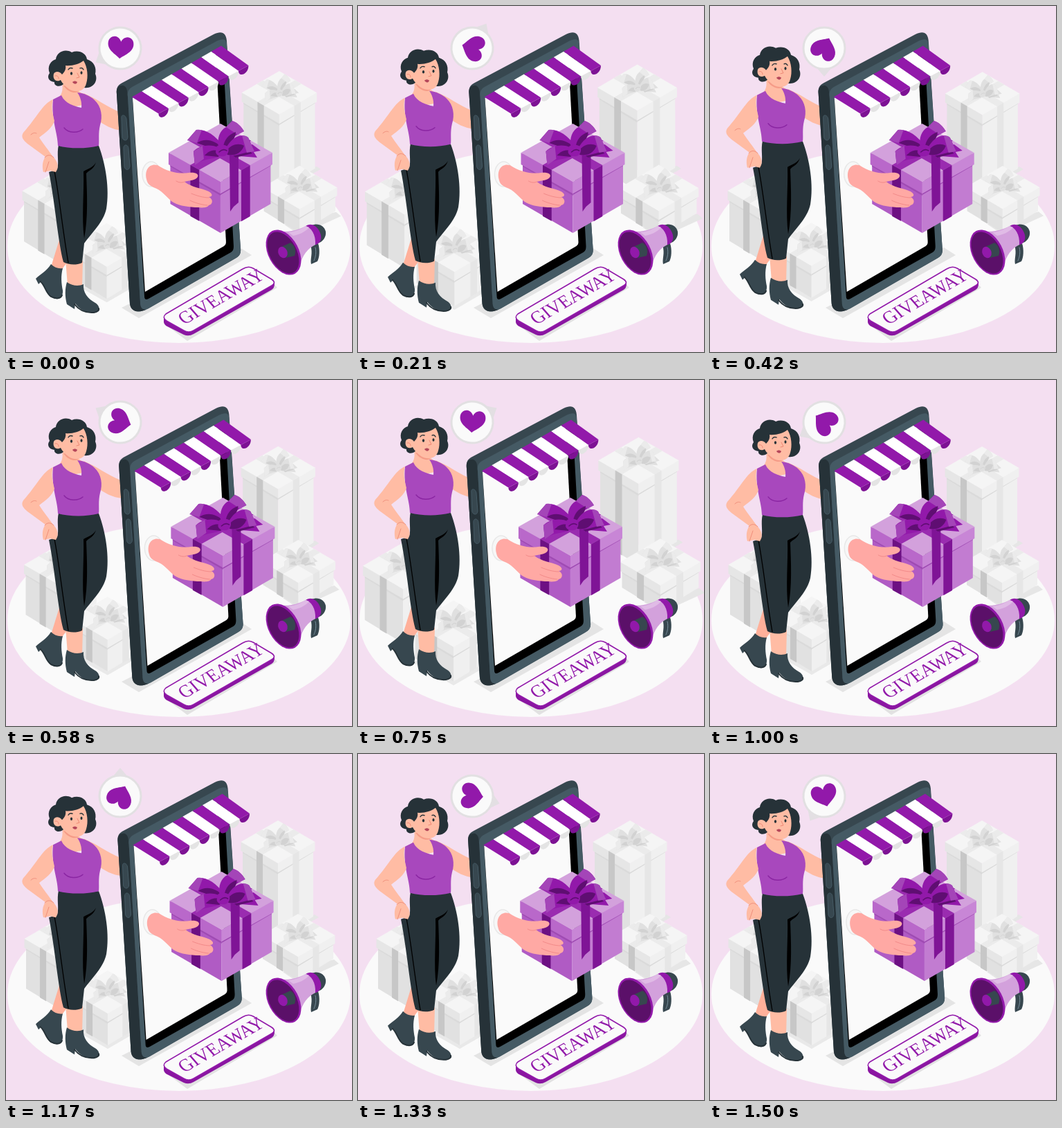
These frames come from a looping animation (500x500 px, 1540 ms). An HTML page:

```html
<!DOCTYPE html>
<html lang="en">
<head>
<meta charset="utf-8">
<title>Giveaway</title>
<style>
html, body { margin: 0; width: 100%; height: 100%; overflow: hidden; background: #f4dff1; }
svg { display: block; width: 100%; height: 100%; }
</style>
</head>
<body>
<svg id="stage" viewBox="0 0 500 500"></svg>
<script>
const LOOP = 1540, STEPS = 37;
const PURPLE = '#9219aa', DARK = '#6d1083', SKIN = '#ffbca4', INK = '#263238', SLATE = '#37474f', STEEL = '#455a64';

const path = (d, fill, extra = '') => `<path d="${d}" fill="${fill}" ${extra}/>`;
const line = (d, color, w) => path(d, 'none', `stroke="${color}" stroke-width="${w}" stroke-linecap="round" stroke-linejoin="round"`);
const poly = (pts, fill) => `<polygon points="${pts.map(p => p.join()).join(' ')}" fill="${fill}"/>`;
const oval = (x, y, rx, ry, fill, extra = '') => `<ellipse cx="${x}" cy="${y}" rx="${rx}" ry="${ry}" fill="${fill}" ${extra}/>`;
const group = (id, body) => `<g id="${id}">${body}</g>`;
const mix = (p, q, u) => [p[0] + (q[0] - p[0]) * u, p[1] + (q[1] - p[1]) * u];
const down = (p, h) => [p[0], p[1] + h];

const grey = { top: '#f5f5f5', left: '#e1e1e1', right: '#f0f0f0', lidL: '#e6e6e6', lidR: '#f0f0f0', edge: '#dadada',
  bandL: '#c7c7c7', bandR: '#e6e6e6', bandT: '#ebebeb', bow: '#e0e0e0', pale: '#ebebeb', deep: '#d2d2d2' };
const violet = { top: '#d3a1dc', left: '#b05bc4', right: '#c27cd1', lidL: '#b968ca', lidR: '#c886d6', edge: '#9f4bb3',
  bandL: DARK, bandR: '#7f1496', bandT: '#9a2cb0', bow: PURPLE, pale: '#a445b8', deep: '#5f0e72' };

function bow(x, y, sx, sy, c) {
  return `<g transform="translate(${x} ${y}) scale(${sx} ${sy})">` +
    path('M6 2L44 -7L56 2L46 4L51 12L12 9Z', c.bow) +
    path('M10 4L32 -4L44 6L20 12Z', c.deep) +
    path('M-4 2C-20 -6 -34 -9 -50 -13L-37 -28C-26 -30 -10 -22 2 -4Z', c.bow) +
    path('M-50 -13L-37 -28L-29 -28L-36 -9Z', c.pale) +
    path('M-36 -9C-24 -17 -10 -13 0 -2L-4 2Z', c.deep) +
    path('M-5 -3C-7 -17 -3 -27 6 -32L15 -41C22 -39 28 -33 32 -26C20 -21 10 -14 6 1Z', c.bow) +
    path('M6 -32L15 -41C22 -39 28 -33 32 -26L23 -21Z', c.pale) +
    path('M2 -3C3 -13 9 -21 20 -25C20 -16 13 -8 6 -2Z', c.deep) +
    path('M5 0C14 -18 28 -24 38 -17L47 3C35 2 22 12 8 8Z', c.bow) +
    path('M29 -20C33 -20 36 -19 38 -17L47 3L36 5Z', c.pale) +
    path('M6 3C14 -8 25 -9 32 -5C28 6 18 10 8 8Z', c.deep) +
    path('M-4 -2C-16 -8 -32 -6 -41 3L-39 23C-30 14 -16 15 -2 10Z', c.bow) +
    path('M-41 3L-28 -5L-26 14L-39 23Z', c.pale) +
    path('M-25 9C-18 1 -10 0 -4 3L-5 11Z', c.deep) +
    path('M-8 -3C-4 -8 6 -7 9 -3C11 3 8 9 3 10C-3 11 -8 9 -9 4Z', c.bow) +
    line('M-4 4C0 0 4 0 7 2', c.deep, 1.6) + '</g>';
}

// Isometric gift: apex at (x, y), half diagonals w and h
function box(x, y, w, h, lid, tall, c) {
  const T = [x, y], L = [x - w, y + h], F = [x, y + 2 * h], R = [x + w, y + h];
  const l = [L[0] + 2.5, L[1]], r = [R[0] - 2.5, R[1]];
  const face = (p, q, a, b, fill) => poly([down(p, a), down(q, a), down(q, b), down(p, b)], fill);
  const band = (a, b, u, v, fill) => face(mix(a, b, u), mix(a, b, v), 0, tall, fill);
  const strip = (a, b, c1, d, u, v, fill) => poly([mix(a, b, u), mix(a, b, v), mix(c1, d, v), mix(c1, d, u)], fill);
  return face(l, F, 0, tall, c.left) + face(F, r, 0, tall, c.right) +
    face(l, F, lid, lid + 3, c.edge) + face(F, r, lid, lid + 2, c.edge) +
    face(L, F, 0, lid, c.lidL) + face(F, R, 0, lid, c.lidR) +
    poly([T, R, F, L], c.top) +
    strip(L, F, T, R, .42, .59, c.bandT) + strip(F, R, L, T, .4, .57, c.bandT) +
    band(L, F, .42, .59, c.bandL) + band(F, R, .4, .57, c.bandR);
}

const present = (x, y, lid, tall) => box(x, y, 53.5, 31, lid, tall, grey) + bow(x, y + 30, .5, .62, grey);

const boxes =
  path('M393 270L452 236L446 232L393 260Z', '#e6e6e6') + present(393, 96, 13, 108) +
  path('M422 330L481 303L474 297L400 315Z', '#e6e6e6') + present(422, 231, 12, 34) +
  present(80, 236, 13, 72) +
  path('M90 394L147 426L204 393L190 385Z', '#e9e9e9') + present(147, 313, 12, 46);

const woman =
  // far arm
  path('M112 126C130 133 146 146 166 154L168 180C154 179 142 172 131 164Z', SKIN) +
  // rear leg and boot
  path('M77 338L90 368L79 383L65 377Z', '#ffb09a') +
  path('M65 373C70 378 76 380 82 379C79 390 80 401 82 411C83 421 75 426 66 421C57 416 57 405 51 398L47 402L43 394C50 387 59 383 65 373Z', SLATE) +
  line('M50 398C57 405 57 414 65 420C73 424 79 423 81 418', INK, 2) +
  path('M86 366L111 368L110 407C102 412 93 410 89 404Z', SKIN) +
  path('M88 399C96 405 106 405 112 402C111 414 118 423 129 429C136 433 137 442 127 443C114 445 106 437 100 430L99 438L88 431C85 420 85 409 88 399Z', SLATE) +
  line('M99 431C106 440 114 444 127 443C132 442 135 440 134 437', INK, 2) +
  // trousers
  path('M76 201L134 202C144 228 150 265 145 293C141 312 124 328 113 343L110 371C101 375 90 374 83 370C75 340 71 285 62 240L74 236C77 226 73 214 76 201Z', INK) +
  path('M130 226C127 236 120 237 116 242C117 270 119 305 113 336C109 305 113 270 112 239C119 235 126 233 130 226Z', '#000') +
  line('M70 239C77 275 82 325 90 371', '#000', 1.3) +
  // neck and chest
  path('M80 106L105 113C102 120 104 124 112 127L116 142L96 146L76 132C82 127 83 118 80 106Z', SKIN) +
  path('M83 115C89 124 99 127 104 124L105 116Z', '#f59b87') +
  // top
  path('M68 135L80 129C85 141 99 145 109 147C110 139 107 130 103 125C113 126 122 130 128 136C138 145 140 160 136 172C133 184 135 194 134 202C114 207 91 206 75 202C75 184 65 164 68 135Z', '#a848bd') +
  line('M84 176C90 184 104 184 111 178', '#8a25a2', 1.4) +
  // near arm
  path('M68 135C53 141 45 161 25 183C21 189 25 194 31 199L57 218C51 226 53 236 54 240L64 238L72 240C78 231 73 223 68 218C62 209 55 201 48 190C57 183 67 176 70 166C67 154 65 145 68 135Z', SKIN) +
  line('M56 219C60 214 65 215 69 219M57 240L62 225M36 186C39 183 42 183 44 184', '#f08f7c', 1) +
  // head
  path('M63 97C59 87 65 79 72 77C73 67 85 61 95 67C105 63 116 68 117 77C127 80 131 89 129 98C134 109 125 120 113 118L105 106L84 112C77 119 69 115 70 110C61 109 59 102 63 97Z', INK) +
  path('M86 86C95 87 106 84 112 79C118 88 119 103 116 112C113 124 101 126 91 120C85 116 81 111 79 107C72 111 67 105 69 98C72 93 78 95 81 99C85 95 87 91 86 86Z', SKIN) +
  oval(94.5, 97.5, 1.6, 2.3, INK) + oval(109, 96.5, 1.5, 2.3, INK) +
  line('M90 92C91 90 93 89 96 90M107 90C109 89 111 90 112 92', INK, 1.4) +
  line('M103 97L106 103L102 104', '#ed8874', 1) +
  path('M96 110C98 108 101 108 103 110C102 113 99 114 96 110Z', '#b5475a') +
  line('M71 101C74 100 76 102 76 105', '#ed8874', 1);

function awning() {
  const a = [182, 131.5], b = [311, 57.5], c = [220.5, 155.5], d = [350.5, 86];
  let s = '';
  for (let i = 0; i < 9; i++) {
    const u = i / 9, v = (i + 1) / 9, p = mix(c, d, u), q = mix(c, d, v), even = i % 2 === 0;
    s += path(`M${p}C${down(p, 10)} ${down(q, 13)} ${q}Z`, even ? '#7d1294' : '#e4e4e4') +
      poly([mix(a, b, u), mix(a, b, v), q, p], even ? PURPLE : '#fff');
  }
  return s;
}

const hand =
  oval(210, 243, 13, 18, '#f7f7f7', 'stroke="#e8e8e8" stroke-width="1.5"') +
  path('M203 250C200 237 207 227 219 230C234 240 250 243 264 241C274 240 279 243 277 247C274 252 265 252 258 254C268 262 282 263 293 268C300 272 298 276 293 276C300 279 299 287 293 288C290 293 280 291 273 291C260 290 247 288 239 282C231 275 225 266 213 262C207 259 204 256 203 250Z', '#ffa9a4') +
  line('M258 254C254 256 249 255 246 253M293 277C285 277 275 274 268 271M291 288C281 287 272 284 266 281', '#f28a89', 1);

const phone =
  path('M160 127C159 118 162 114 168 111L300 41C312 35 318 39 319 50L339 350C340 358 337 362 331 365L206 437C191 445 181 442 179 430Z', SLATE) +
  path('M160 127C159 118 163 114 170 115C176 118 175 124 176 131L194 428C194 434 197 438 202 439C190 444 180 441 179 430Z', INK) +
  path('M176 131C175 123 178 119 184 116L304 51C314 46 319 48 319 56L339 350C340 358 337 362 331 365L206 437C198 441 194 437 194 428Z', STEEL) +
  path('M183 134L304 66C310 63 313 64 313.5 69L329 347C329 352 328 354 325 356L206 423C202 425 200 424 200 419Z', '#000') +
  path('M183 133L303 66L318 341C318 344 317 345 315 347L201 413Z', '#fafafa') +
  path('M167 162C166 156 173 157 174 163L176 189C176 196 169 195 168 190ZM170 205C170 199 177 200 177 206L179 231C179 238 172 238 171 232Z', SLATE, `stroke="${STEEL}"`) +
  awning();

const gift = box(310, 170, 75, 42, 17, 74, violet) +
  path('M323 210L336 206L336 284L329 290L324 297Z', '#7f1496') +
  bow(312, 207, 1, 1, violet);

const sign =
  path('M230 460L262 484L392 407L382 396Z', '#e2e2e2') +
  path('M228 449V457Q229 461 233 463L257 475Q264 478 271 474L384 410Q388 407 388 402V399Z', '#8a16a1') +
  path('M231 445L342 380Q350 375 357 379L384 395Q391 400 384 404L271 469Q264 473 257 469L232 455Q225 450 231 445Z', '#fafafa', `stroke="${PURPLE}" stroke-width="1.6"`) +
  `<text transform="matrix(.866 -.5 .7 .8 316.5 427)" text-anchor="middle" font-family="Liberation Serif, Times, serif" font-size="26" fill="${PURPLE}">GIVEAWAY</text>`;

const horn =
  path('M440 346L451 343C454 352 453 364 450 369L441 373C439 366 444 357 440 346Z', SLATE) +
  line('M447 349C449 356 447 364 445 368', '#78909c', 1) +
  path('M442 317C450 313 460 317 462 326C463 334 458 341 450 343Z', SLATE) +
  path('M432 319C439 313 447 316 452 324C457 332 457 341 448 345L438 345Z', PURPLE) +
  path('M389 324C405 328 420 325 433 318C441 320 448 330 447 345C436 350 428 361 425 374Z', '#d3a1dc') +
  path('M408 327C419 326 427 322 433 318L438 320C432 327 424 330 415 332Z', '#e0bbe6') +
  oval(401, 356, 22, 35, PURPLE, 'transform="rotate(-28 401 356)"') +
  oval(400.5, 356.5, 19.5, 32.5, '#5b1069', 'transform="rotate(-28 400.5 356.5)"') +
  path('M398 348L411 342C417 345 420 354 417 361L404 364Z', SLATE) +
  oval(400, 356, 6.5, 8.5, PURPLE, 'transform="rotate(-24 400 356)"');

const heart = 'M0 16C-7 10 -19 5 -19 -6C-19 -14 -13 -17 -9 -16.5C-4 -16 -1 -12 0 -9C1 -12 4 -16 9 -16.5C13 -17 19 -14 19 -6C19 5 7 10 0 16Z';
const bubble =
  group('balloon', path('M27 -12L41 0L27 12Z', '#e3dfe3') + oval(0, 0, 30, 30, '#fafafa', 'stroke="#e2e0e2" stroke-width="3"')) +
  group('heart', path(heart, PURPLE));

document.getElementById('stage').innerHTML =
  '<rect width="500" height="500" fill="#f4dff1"/>' + oval(250, 347, 248, 140, '#fafafa') +
  group('boxes', boxes) + path('M167 436L192 451L355 360L338 349Z', '#e4e4e4') +
  group('woman', woman) + group('phone', phone + gift + hand) + sign + horn + bubble;

const smooth = u => u * u * (3 - 2 * u);
function track(keys, p, curve = u => u) {
  const i = Math.max(1, keys.findIndex(k => k[0] >= p));
  const [a, v] = keys[i - 1], [b, w] = keys[i];
  return v + (w - v) * curve((p - a) / (b - a));
}
const beat = [[0, 1], [.1, 1.1], [.3, 1], [.4, 1], [.5, 1.1], [.6, 1], [1, 1]];
const shake = [0, -1, 2, -4, 4, -4, 4, -4, 2, -1, 0].map((v, i) => [i / 10, v]);

const move = (id, t) => document.getElementById(id).setAttribute('transform', t);

function draw(ms) {
  const step = Math.min(STEPS - 1, Math.floor((ms % LOOP + 4) * STEPS / LOOP));
  const n = step > 28 ? 28 + (step - 28) * 7 / 8 : step;
  const p = Math.min(1, n / 36 + .0133);
  const lift = smooth(1 - Math.abs(1 - 2 * p));
  move('boxes', `translate(250 250) scale(${track(beat, p)}) translate(-250 -250)`);
  move('woman', `translate(0 ${-10 * lift})`);
  move('phone', `translate(${.85 * track(shake, p, smooth)} 0)`);
  move('balloon', `translate(165 61) rotate(${150 + 30 * n})`);
  move('heart', `translate(165.5 60.5) rotate(${5 + 20 * n}) scale(.97)`);
}

let start;
function tick(now) {
  start ??= now;
  draw(now - start);
  requestAnimationFrame(tick);
}
draw(0);
requestAnimationFrame(tick);
</script>
</body>
</html>
```
